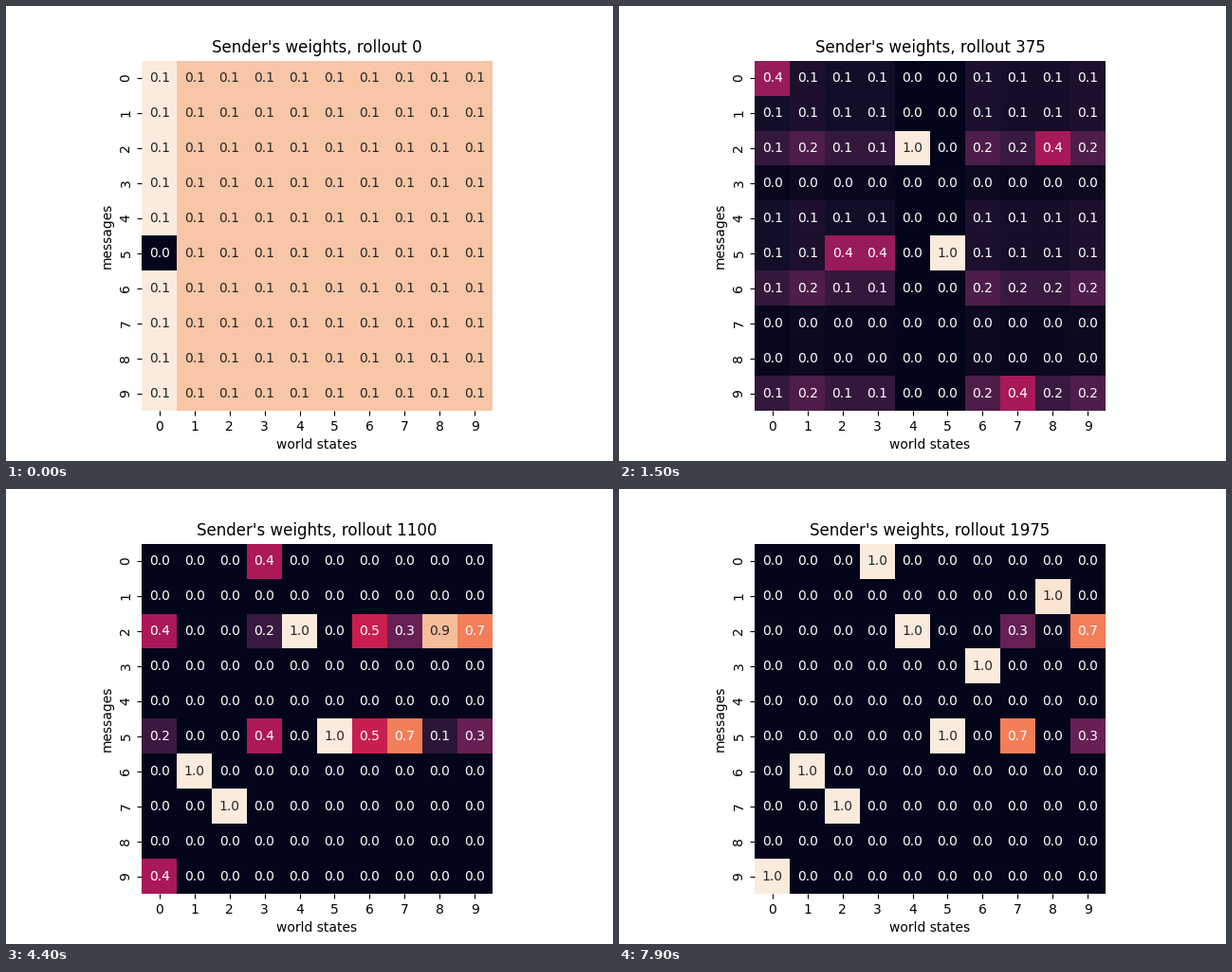
These frames come from a looping animation (640 by 480 pixels, 8 s). A matplotlib script:

```python
import numpy as np
import matplotlib.pyplot as plt
from matplotlib.animation import FuncAnimation
from matplotlib.colors import LinearSegmentedColormap

N = 10
FRAMES = 80
ROLLOUTS_PER_FRAME = 25

ROCKET = LinearSegmentedColormap.from_list("rocket", [
    "#03051a", "#221331", "#451c47", "#691f55", "#921c5b", "#b91657",
    "#d92847", "#ed503e", "#f47d57", "#f6a47c", "#f7c9aa", "#faebdd"])

# Each state's weights are a softmax over whole-number scores per message.
# A message has a common score in all states, given at a few key times ...
KEY_TIMES = [0, 8, 15, 27, 44]
GOOD, FAIR = [2, 5], [1, 0]

# ... some (message, state) pairs stand out at a key time ...
STANDOUTS = {
    # (key index, score): pairs
    (0, -1): [(5, 0)],
    (1, 2): [(0, 0), (3, 0), (6, 0), (1, 1), (7, 1), (7, 2), (6, 3), (8, 3),
             (0, 6), (9, 7), (1, 8), (4, 8), (2, 9), (9, 9)],
    (2, 2): [(0, 0), (5, 2), (5, 3), (9, 7), (2, 8)],
    (3, 2): [(5, 2), (5, 3), (5, 7), (2, 8)],
    (3, 1): [(5, 6)],
}

# ... and an agreed pair climbs one point per frame from zero at a given time.
AGREED = {(2, 4): 6, (5, 5): 6, (7, 2): 26, (6, 1): 34,
          (0, 3): 42, (9, 0): 43, (3, 6): 48, (1, 8): 73}
TOP_SCORE = 10

# Each pair takes its whole-number steps at its own moment.
PHASE = np.random.default_rng(4).uniform(0.1, 0.9, (N, N))


def key_scores():
    keys = np.zeros((len(KEY_TIMES), N, N))
    common = keys.transpose(0, 2, 1)  # last axis: message
    common[1] = [0, 1, 0, -1, 0, 1, 1, 1, 0, 0]
    common[2] = [0, 0, 1, -1, 0, 0, 1, -1, -1, 1]
    common[3] = -3
    common[3][:, GOOD] = FAIR
    for (k, score), pairs in STANDOUTS.items():
        for pair in pairs:
            keys[k][pair] = score
    keys[4] = -6
    keys[4][GOOD] = keys[3][GOOD]
    return keys


KEYS = key_scores()


def weights(i):
    k = min(np.searchsorted(KEY_TIMES, i, side="right"), len(KEY_TIMES) - 1)
    t0, t1 = KEY_TIMES[k - 1:k + 1]
    u = min((i - t0) / (t1 - t0), 1)
    scores = np.floor(KEYS[k - 1] * (1 - u) + KEYS[k] * u + PHASE)
    for pair, zero in AGREED.items():
        scores[pair] = max(scores[pair], min(i - zero, TOP_SCORE))
    e = np.exp(scores)
    return e / e.sum(axis=0)


def luminance(rgba):
    c = rgba[..., :3]
    lin = np.where(c <= 0.03928, c / 12.92, ((c + 0.055) / 1.055) ** 2.4)
    return lin @ [0.2126, 0.7152, 0.0722]


plt.rcParams["font.family"] = "DejaVu Sans"
fig, ax = plt.subplots(figsize=(6.4, 4.8), dpi=100)
mesh = ax.pcolormesh(weights(0), cmap=ROCKET)
ax.set(xlim=(0, N), ylim=(N, 0), aspect="equal",
       xlabel="world states", ylabel="messages")
ax.spines[:].set_visible(False)
centers = np.arange(N) + 0.5
ax.set_xticks(centers, range(N))
ax.set_yticks(centers, range(N), rotation="vertical", va="center")
title = ax.set_title("")
labels = [ax.text(x, y, "", ha="center", va="center")
          for y in centers for x in centers]


def update(i):
    w = weights(i)
    mesh.set_array(w)
    mesh.set_clim(w.min(), w.max())
    dark_text = luminance(mesh.to_rgba(w)) > 0.408
    for label, value, dark in zip(labels, w.flat, dark_text.flat):
        label.set_text(f"{value:.1f}")
        label.set_color(".15" if dark else "w")
    title.set_text(f"Sender's weights, rollout {i * ROLLOUTS_PER_FRAME}")
    return [mesh, title, *labels]


anim = FuncAnimation(fig, update, frames=FRAMES, interval=100,
                     repeat=True, repeat_delay=0, blit=False)
plt.show()
```
